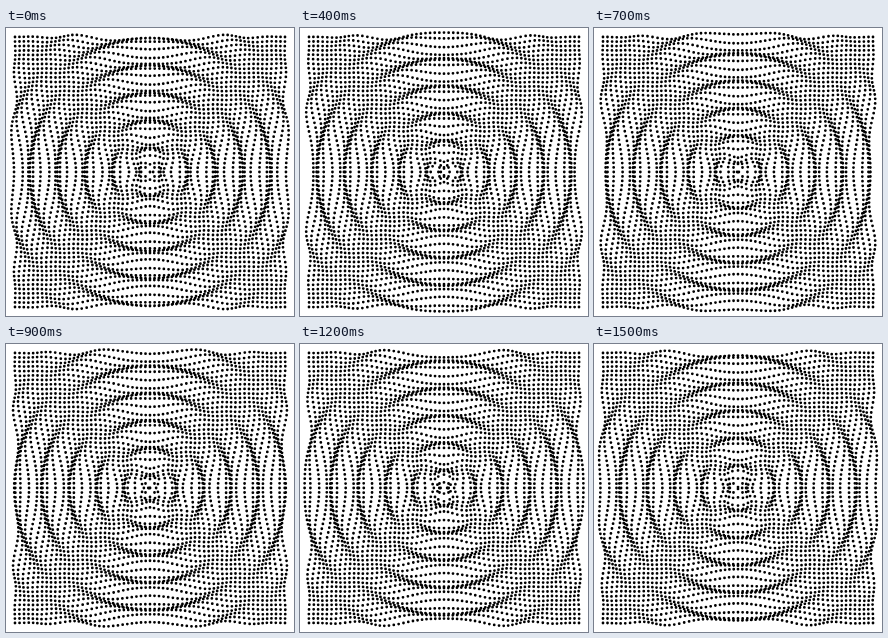
Animation of 288x288 px, one loop 1600 ms. Source, as an HTML page with a canvas:

```html
<!DOCTYPE html>
<html lang="en">
<head>
<meta charset="utf-8">
<title>Dot ripple</title>
<style>
  html, body { margin: 0; width: 100%; height: 100%; overflow: hidden; background: #fff; }
  canvas { display: block; width: 288px; height: 288px; }
</style>
</head>
<body>
<canvas id="stage" width="288" height="288"></canvas>
<script>
const ctx = document.getElementById('stage').getContext('2d');
const SIZE = 288;
const CENTER = SIZE / 2;
const HALF_COUNT = 30;
const SPACING = 4.5;
const WAVELENGTH = 27.5;
const PHASE_OFFSET = 0.125;
const AMPLITUDE = 4.5;
const DOT_RADIUS = 1.4;
const LOOP = 1600;
const STEP = 100;
const TAU = Math.PI * 2;

// Radial wave, in opposite phase on the two axes and still on the diagonals.
function displace(x, y, phase) {
  const r = Math.hypot(x, y);
  const angle = Math.atan2(y, x);
  const wave = Math.sin(TAU * (r / WAVELENGTH + PHASE_OFFSET - phase));
  const shift = AMPLITUDE * Math.cos(2 * angle) * wave;
  return [x + shift * Math.cos(angle), y + shift * Math.sin(angle)];
}

function draw(phase) {
  ctx.fillStyle = '#fff';
  ctx.fillRect(0, 0, SIZE, SIZE);
  ctx.fillStyle = '#000';
  ctx.beginPath();
  for (let row = -HALF_COUNT; row <= HALF_COUNT; row++) {
    for (let col = -HALF_COUNT; col <= HALF_COUNT; col++) {
      const [x, y] = displace(col * SPACING, row * SPACING, phase);
      ctx.moveTo(CENTER + x + DOT_RADIUS, CENTER + y);
      ctx.arc(CENTER + x, CENTER + y, DOT_RADIUS, 0, TAU);
    }
  }
  ctx.fill();
}

const start = performance.now();

function frame() {
  const time = (performance.now() - start) % LOOP;
  draw(Math.floor(time / STEP) * STEP / LOOP);
  requestAnimationFrame(frame);
}

frame();
</script>
</body>
</html>
```
